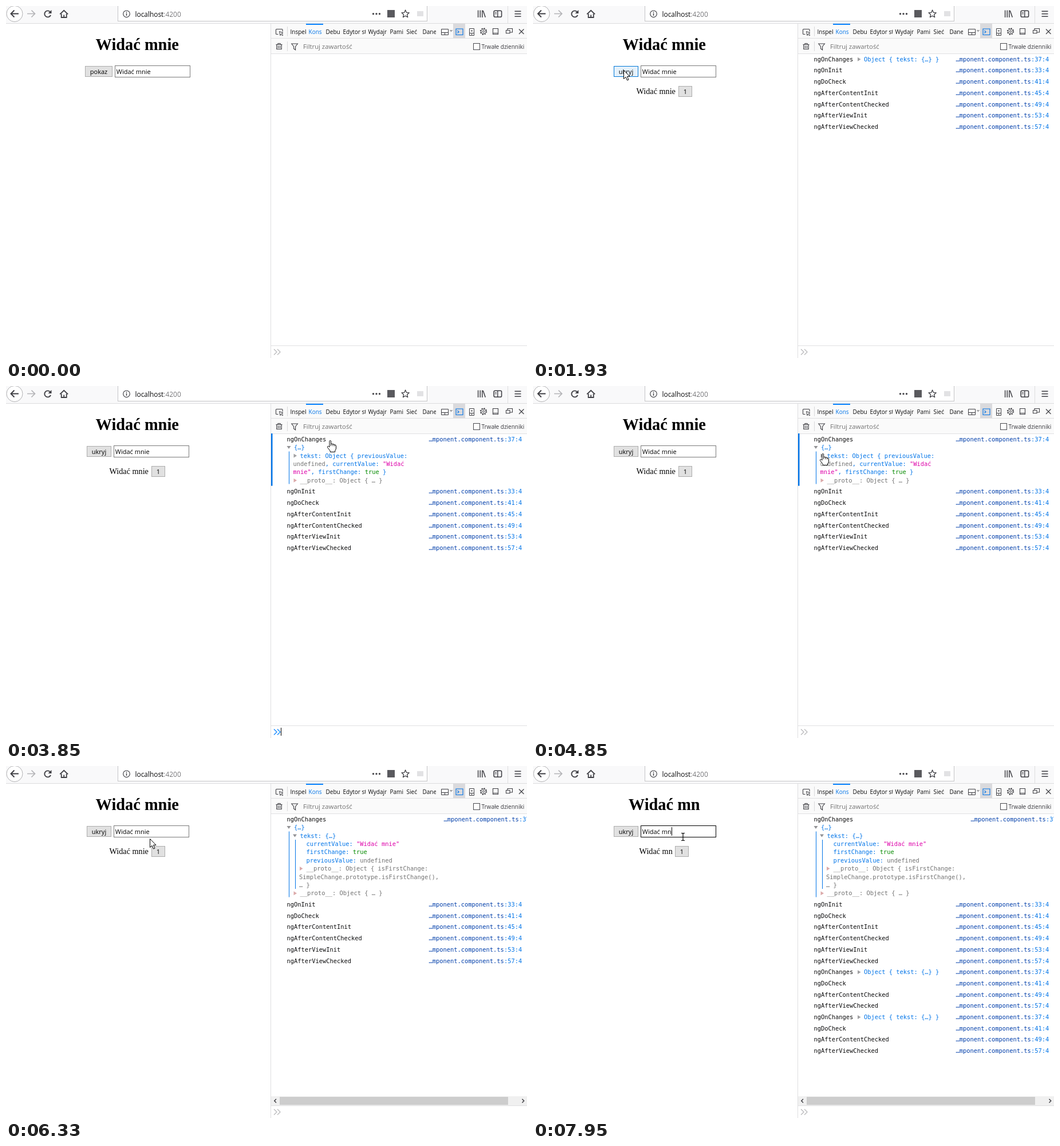
An HTML page that plays this animation: 910x616 px, repeating every 8 s.

```html
<!DOCTYPE html>
<html lang="pl">
<head>
<meta charset="utf-8">
<title>Widać mnie</title>
<style>
html, body { margin: 0; width: 100%; height: 100%; overflow: hidden; background: #fff; }
svg { display: block; }
text { white-space: pre; }
.ui { font-family: "Open Sans", "Noto Sans", sans-serif; }
.page { font-family: "Liberation Serif", serif; }
.mono { font: 10.4px "DejaVu Sans Mono", monospace; }
.line { fill: none; stroke: #3f3f44; }
</style>
</head>
<body>
<svg width="910" height="616" viewBox="0 0 910 616">
  <rect width="910" height="616" fill="#fff"/>
  <g id="chrome"></g>
  <g id="live"></g>
</svg>
<script>
const BLUE = '#0074e8', GREY = '#737373', PINK = '#dd00a9', GREEN = '#058b00', NAVY = '#003eaa', INK = '#0c0c0d';

const rect = (x, y, w, h, fill, stroke) => stroke
  ? `<rect x="${x + .5}" y="${y + .5}" width="${w - 1}" height="${h - 1}" fill="${fill}" stroke="${stroke}"/>`
  : `<rect x="${x}" y="${y}" width="${w}" height="${h}" fill="${fill}"/>`;
const line = (d, w = 1, extra = '') => `<path class="line" d="${d}" stroke-width="${w}" ${extra}/>`;
const shape = (d, fill) => `<path d="${d}" fill="${fill}"/>`;
const ui = (x, y, size, str, fill = INK, extra = '') =>
  `<text class="ui" x="${x}" y="${y}" font-size="${size}" fill="${fill}" ${extra}>${str}</text>`;
const mono = (x, y, str, fill = INK) => `<text class="mono" x="${x}" y="${y}" fill="${fill}">${str}</text>`;
const span = (fill, str) => `<tspan fill="${fill}">${str}</tspan>`;
const lerp = (a, b, p) => a + (b - a) * p;

function star(cx, cy) {
  let d = '';
  for (let i = 0; i < 10; i++) {
    const a = i * Math.PI / 5, r = i % 2 ? 3.2 : 7;
    d += (i ? 'L' : 'M') + (cx + r * Math.sin(a)).toFixed(2) + ' ' + (cy - r * Math.cos(a)).toFixed(2);
  }
  return line(d + 'Z', 1.3, 'stroke-linejoin="round"');
}

function browserBar() {
  const pale = 'style="stroke:#b4b4b7"';
  return rect(0, 0, 910, 30, '#f9f9fa') + rect(0, 30, 910, 1, '#dcdcde') +
    '<circle cx="15" cy="13.5" r="14" fill="#fff" stroke="#b1b1b3"/>' +
    line('M22 13.5H9M14.5 7.5L8.5 13.5L14.5 19.5', 1.9) +
    line('M37 13.5H50M44.5 7.5L50.5 13.5L44.5 19.5', 1.7, pale) +
    line('M77.3 10.6A5.5 5.5 0 1 0 78 15.8', 1.9) + shape('M79.5 7V13H73.5Z', '#3f3f44') +
    line('M94.2 14.3L101.2 7.8L108.2 14.3', 1.8) + line('M96.7 13.5V20H105.7V13.5M101.2 20V15.5', 1.8) +
    rect(195, -1, 541, 28, '#fff', '#c4c4c6') +
    '<circle class="line" cx="210.5" cy="13.8" r="5.8" stroke-width="1.2"/>' + line('M210.5 12.8V17M210.5 10.3V11.7', 1.4) +
    ui(225.5, 18.5, 11.9, 'localhost' + span('#77777a', ':4200')) +
    [641.5, 647, 652.5].map(x => `<circle cx="${x}" cy="13.8" r="1.7" fill="#4a4a4f"/>`).join('') +
    rect(666, 7, 13, 13, '#5a5a5e') + star(697.6, 14) + rect(718, 9, 11, 9, '#e2e2e4') +
    line('M824.6 7.5V20M828.3 7.5V20M831.8 7.5V20M833.2 8L837.3 19.8', 1.5) +
    '<rect class="line" x="852.2" y="8.2" width="13.4" height="11" rx="2" stroke-width="1.6"/>' +
    line('M858.8 8V19.5', 1.4) + line('M854 11.5H857M854 13.8H857') +
    rect(876, 0, 1, 30, '#dddddf') + line('M888.5 9.3H899.5M888.5 13.8H899.5M888.5 18.3H899.5', 1.6);
}

const TABS = [['Inspektor', 497, 524], ['Konsola', 529, 552], ['Debuger', 559, 583], ['Edytor stylów', 589, 628],
  ['Wydajność', 633, 665], ['Pamięć', 671, 694], ['Sieć', 700, 720], ['Dane', 728, 751]];

function devTools() {
  const blue = `style="stroke:${BLUE}"`;
  const tabs = TABS.map(([name, x, end], i) =>
    `<clipPath id="tab${i}"><rect x="${x - 1}" y="34" width="${end - x + 1}" height="20"/></clipPath>` +
    ui(x - .5, 48.5, 10, name, i === 1 ? BLUE : INK, `clip-path="url(#tab${i})"`)).join('');
  return rect(463, 31, 447, 52, '#fafafa') + rect(462, 31, 1, 585, '#dfdfe1') +
    [56, 83, 594].map(y => rect(463, y, 447, 1, '#e0e0e2')).join('') +
    rect(491, 36, 1, 17, '#d8d8da') + rect(491, 62, 1, 17, '#d8d8da') +
    tabs + rect(524, 31, 30, 2, '#0a84ff') +
    line('M475.5 49.5H472.5Q471.5 49.5 471.5 48.5V41.5Q471.5 40.5 472.5 40.5H482Q483 40.5 483 41.5V45', 1.1) +
    line('M477.5 44.5L484 47.2L481.2 48.2L483.8 51L482.8 52L480 49.3L479 51.6Z') +
    line('M760.5 40.5H772.5V50.5H760.5ZM760.5 46.5H772.5M766.5 46.5V50.5') + shape('M774.5 42H780.5L777.5 45.5Z', '#a4a4a6') +
    rect(781, 31, 21, 25, '#dadadd') +
    line('M786 40H798V50.5H786Z', 1.1, blue) + line('M788.5 43L791 45.2L788.5 47.5', 1.1, blue) +
    line('M809.5 39.5H817.5V51.5H809.5ZM809.5 47.5H817.5') + line('M812 43.5H815M812.5 49.5H814.5', 1.4) +
    '<circle class="line" cx="834" cy="44.5" r="5.3" stroke-width="1.8" stroke-dasharray="2.1 2.06"/>' +
    '<circle class="line" cx="834" cy="44.5" r="4.2"/><circle class="line" cx="834" cy="44.5" r="1.7"/>' +
    line('M850.5 39.5H859.5V49.5H850.5ZM850.5 47.5H859.5', 1.1) +
    line('M876 43V39.5H884.5V46H880M873.5 42.5H880V47.8H873.5Z', 1.1) +
    line('M896 40.5L904.5 49M904.5 40.5L896 49', 1.2) +
    line('M471.5 67.5H482.5M475 67V65.5H479V67M472.8 68V75.5H481.2V68M475.5 69.5V74M478.5 69.5V74', 1.2) +
    line('M498.8 66H509.4L505.6 71V76.8L502.6 74.6V71Z', 1.1) +
    ui(519, 75, 11.3, 'Filtruj zawartość', GREY) +
    rect(816, 65, 12, 12, '#fff', '#4a4a4f') + ui(830.5, 74.5, 10, 'Trwałe dzienniki', '#38383d');
}

// pointer moves: start, end, steps, quadratic curve, shape
const MOVES = [
  [320, 1090, 11, [133, 25, 131, 85, 158, 111], 'arrow'],
  [1180, 1180, 1, [158, 111, 158, 112, 158, 112], 'arrow'],
  [2410, 3170, 11, [158, 112, 380, 58, 565, 96], 'auto'],
  [3240, 3240, 1, [565, 96, 566, 95, 566, 95], 'beam'],
  [3320, 3390, 2, [566, 93, 566, 94, 566, 95], 'hand'],
  [4080, 4390, 5, [566, 95, 540, 96, 506, 115], 'hand'],
  [4700, 4850, 3, [506, 115, 506, 117, 506, 118], 'hand'],
  [5310, 5630, 5, [506, 118, 560, 132, 622, 176], 'hand'],
  [5710, 6100, 6, [622, 176, 380, 340, 238, 133], 'auto'],
  [6190, 6410, 4, [238, 133, 252, 126, 262, 124], 'auto']
];

const inside = (c, x, y, w, h) => c && c.x >= x && c.x < x + w && c.y >= y && c.y < y + h;

function pointer(t) {
  const m = MOVES.filter(m => t >= m[0]).pop();
  if (!m) return null;
  const [t0, t1, n, [ax, ay, bx, by, cx, cy], kind] = m;
  const k = n > 1 ? Math.min(n - 1, Math.floor((t - t0) / (t1 - t0) * (n - 1) + 1e-6)) : 0;
  const p = (k + 1) / n, e = p * p * (3 - 2 * p);
  const c = {
    x: Math.round(lerp(lerp(ax, bx, e), lerp(bx, cx, e), e)),
    y: Math.round(lerp(lerp(ay, by, e), lerp(by, cy, e), e)), kind
  };
  if (kind === 'auto') {
    const beam = (c.x > 463 && c.y > 83) || inside(c, 188, 104, 132, 22);
    c.kind = beam ? 'beam' : 'arrow';
  }
  return c;
}

const CURSORS = {
  arrow: '<path d="M.5 .5V15.5L4 12.3L6.5 18L9 17L6.5 11.3H11Z" fill="#fff" stroke="#000"/>',
  beam: line('M-3 -6.5H-1L0 -5.5L1 -6.5H3M0 -5.5V5.5M-3 6.5H-1L0 5.5L1 6.5H3', 1.2, 'style="stroke:#000"'),
  hand: '<path d="M-1 1.5Q-1 .5 .3 .5Q1.7 .5 1.7 1.8V6.5Q4.5 5.5 5 7Q7.5 6.2 8 8Q10.5 7.7 10.5 9.8V14Q10.5 16 8.7 18V20.5H.2V18.5L-4.5 12.5Q-5 10.5 -3.4 10.3Q-2.3 10.3 -1 12Z" fill="#fff" stroke="#000"/>' +
    line('M1.7 6.5V10M5 7V10.2M8 8V10.5', .9, 'style="stroke:#000"')
};

const LOG = { ngOnChanges: 37, ngOnInit: 33, ngDoCheck: 41, ngAfterContentInit: 45,
  ngAfterContentChecked: 49, ngAfterViewInit: 53, ngAfterViewChecked: 57 };
const UPDATE = ['ngOnChanges', 'ngDoCheck', 'ngAfterContentChecked', 'ngAfterViewChecked'];
const ROW = 19.7, SUB = 14.4, TOP = 96.7;

const right = (x, y, c) => shape(`M${x} ${y - 7}V${y}L${x + 5.5} ${y - 3.5}Z`, c);
const down = (x, y) => shape(`M${x} ${y - 6}H${x + 7}L${x + 3.5} ${y - 1}Z`, '#929295');

function tree(level) {
  const y = n => TOP + n * SUB, rose = '#dba9a9';
  const proto = n => right(502.5, y(n), rose) + mono(513.6, y(n), '__proto__: Object { … }', GREY);
  const rule = (x, a, h) => rect(x, a, 1, h, BLUE);
  let out = down(490.5, y(1)) + mono(503, y(1), '{…}', BLUE);
  if (level === 1) {
    return out + rule(494, 114.5, 57) + right(502.5, y(2), '#a0a0a2') +
      mono(513.6, y(2), 'tekst: Object { previousValue:', BLUE) +
      mono(501.5, y(3), span(GREY, 'undefined') + ', currentValue: ' + span(PINK, '"Widać'), BLUE) +
      mono(501.5, y(4), span(PINK, 'mnie"') + ', firstChange: ' + span(GREEN, 'true') + ' }', BLUE) + proto(5);
  }
  return out + rule(494, 114.5, 115) + rule(505, 129, 86) + down(501, y(2)) + mono(513.6, y(2), 'tekst: {…}', BLUE) +
    mono(524.5, y(3), 'currentValue: ' + span(PINK, '"Widać mnie"'), BLUE) +
    mono(524.5, y(4), 'firstChange: ' + span(GREEN, 'true'), BLUE) +
    mono(524.5, y(5), 'previousValue: ' + span(GREY, 'undefined'), BLUE) +
    right(513, y(6), rose) + mono(524.5, y(6), '__proto__: Object { isFirstChange:', GREY) +
    mono(512, y(7), 'SimpleChange.prototype.isFirstChange(),', GREY) + mono(512, y(8), '… }', GREY) + proto(9);
}

function consoleLog(t, c) {
  if (t < 1850) return '';
  const level = t < 3770 ? 0 : t < 5000 ? 1 : 2;
  const names = Object.keys(LOG);
  if (t >= 7800) names.push(...UPDATE);
  if (t >= 7950) names.push(...UPDATE);
  let y = TOP, out = '';
  names.forEach((name, i) => {
    const open = i === 0 && level;
    const h = ROW + (open ? [0, 5, 9][level] * SUB : 0);
    if (inside(c, 463, y - 13.7, 447, h)) out += rect(463, y - 13.7, 2.5, h, BLUE);
    out += mono(490.5, y, name);
    if (open) out += tree(level);
    else if (name === 'ngOnChanges') out += right(567, y, '#a0a0a2') + mono(578, y, 'Object { tekst: {…} }', BLUE);
    out += mono(open && t >= 5080 ? 764.5 : 738.5, y, span(NAVY, '…mponent.component.ts') + span(BLUE, `:${LOG[name]}:4`));
    y += h;
  });
  if (t >= 5080) {
    out += rect(463, 578, 447, 16, '#f0f0f0') + rect(478, 579, 399, 14, '#cdcdcd') +
      line('M472 582.8L468.8 586L472 589.2M901.5 582.8L904.7 586L901.5 589.2', 1.5);
  }
  return out;
}

function prompt(t) {
  const on = t >= 3770 && t < 4620;
  return line('M468 600.5L473 605.5L468 610.5M474 600.5L479 605.5L474 610.5', 1.2, `style="stroke:${on ? '#0a84ff' : '#b8b8ba'}"`) +
    (t >= 3850 && t < 4390 ? rect(480, 598, 1, 14, '#000') : '');
}

const WORD = 'Widać mnie';

function page(t, c) {
  const open = t >= 1850;
  const typed = t < 7720 ? 0 : t < 7870 ? 1 : 2;
  const shown = t < 7800 ? 0 : t < 7950 ? 1 : 2;
  const cut = n => WORD.slice(0, WORD.length - n);
  const bx = open ? 141 : 138, bw = open ? 43 : 48, ix = open ? 188 : 190;

  let fill = '#e1e1e1', edge = '#adadad', focus = false;
  if (t >= 1710 && t < 1850) { fill = '#cce4f7'; edge = '#005499'; }
  else if (inside(c, bx, 105, bw, 19)) { fill = '#e5f1fb'; edge = '#0078d7'; }
  else if (open && t < 3620) { edge = '#0078d7'; focus = true; }

  const active = t >= 6560;
  const frame = active ? '#000' : inside(c, ix, 104, 132, 22) ? '#171717' : '#7a7a7a';
  const caret = active && (t < 7030 || t >= 7570);
  let out = `<text class="page" x="229.2" y="77" font-size="28.4" font-weight="700" text-anchor="middle">${cut(shown)}</text>` +
    rect(bx, 105, bw, 19, fill, edge) + (focus ? rect(bx + 1, 106, bw - 2, 17, 'none', edge) : '') +
    ui(bx + bw / 2, 119, 11, open ? 'ukryj' : 'pokaz', '#000', 'text-anchor="middle"') +
    rect(ix, 104, 132, 21, '#fff', frame) + ui(ix + 2.8, 119, 11, cut(typed), '#000');
  if (caret) out += rect([251, 245, 242][typed], 107, 1, 15, '#000');
  if (open) {
    const x = [180.5, 183.6, 185.6][shown], b = [254, 250, 248][shown];
    out += `<text class="page" x="${x}" y="154" font-size="14.2">${cut(shown)}</text>` +
      rect(b, 140, 24, 19, '#e1e1e1', '#adadad') + ui(b + 12, 154, 11, '1', '#000', 'text-anchor="middle"');
  }
  return out;
}

const live = document.getElementById('live');
let last = '';

function draw(t) {
  const c = pointer(t);
  const out = page(t, c) + consoleLog(t, c) + prompt(t) +
    (c ? `<g transform="translate(${c.x} ${c.y})">${CURSORS[c.kind]}</g>` : '');
  if (out !== last) live.innerHTML = last = out;
}

document.getElementById('chrome').innerHTML = browserBar() + devTools();
const start = performance.now();
function tick() {
  draw((performance.now() - start) % 8000);
  requestAnimationFrame(tick);
}
tick();
</script>
</body>
</html>
```
